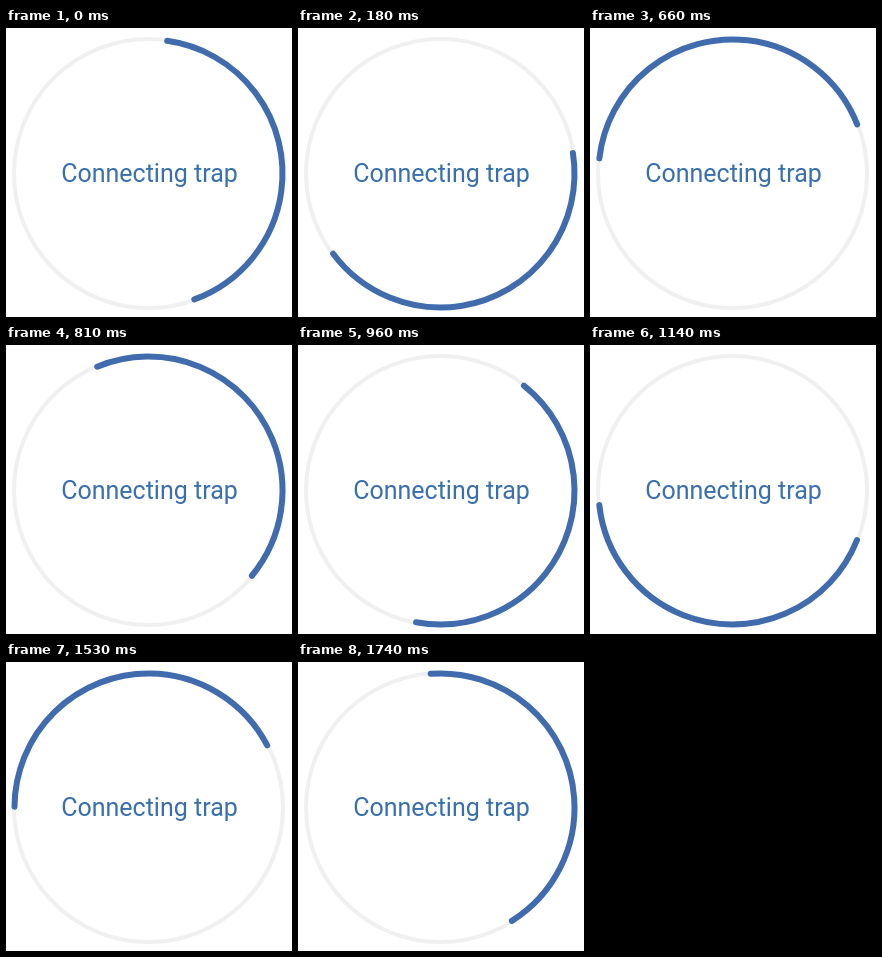
Recreate the animation shown at these times as an HTML page. Size 286 by 289 pixels, loop 1.8 s.

```html
<!DOCTYPE html>
<html lang="en">
<head>
<meta charset="utf-8">
<title>Connecting</title>
<style>
  html, body { margin: 0; width: 100%; height: 100%; overflow: hidden; background: #fff; }
  svg { display: block; }
  circle { fill: none; }
  text { font: 25px Roboto, sans-serif; fill: #386fae; text-anchor: middle; }
</style>
</head>
<body>
<svg width="286" height="289" viewBox="0 0 286 289">
  <circle cx="142.5" cy="145.5" r="134.5" stroke="#f0f0f0" stroke-width="4"/>
  <!-- 152 degree arc, starting at the top -->
  <circle id="arc" cx="142.5" cy="145.5" r="134" stroke="#406cae" stroke-width="6"
    stroke-linecap="round" pathLength="360" stroke-dasharray="152 208"/>
  <text x="143.5" y="154">Connecting trap</text>
</svg>
<script>
  const LOOP = 1800, STEP = 30, STEPS = 59, START = 8;
  const arc = document.getElementById('arc');
  const begin = performance.now();

  // Two turns per loop in equal steps; the last step is held twice as long.
  function draw() {
    const t = (performance.now() - begin) % LOOP;
    const step = Math.min(Math.floor(t / STEP), STEPS - 1);
    const angle = START + step * 720 / STEPS - 90;
    arc.setAttribute('transform', `rotate(${angle} 142.5 145.5)`);
    requestAnimationFrame(draw);
  }
  draw();
</script>
</body>
</html>
```
